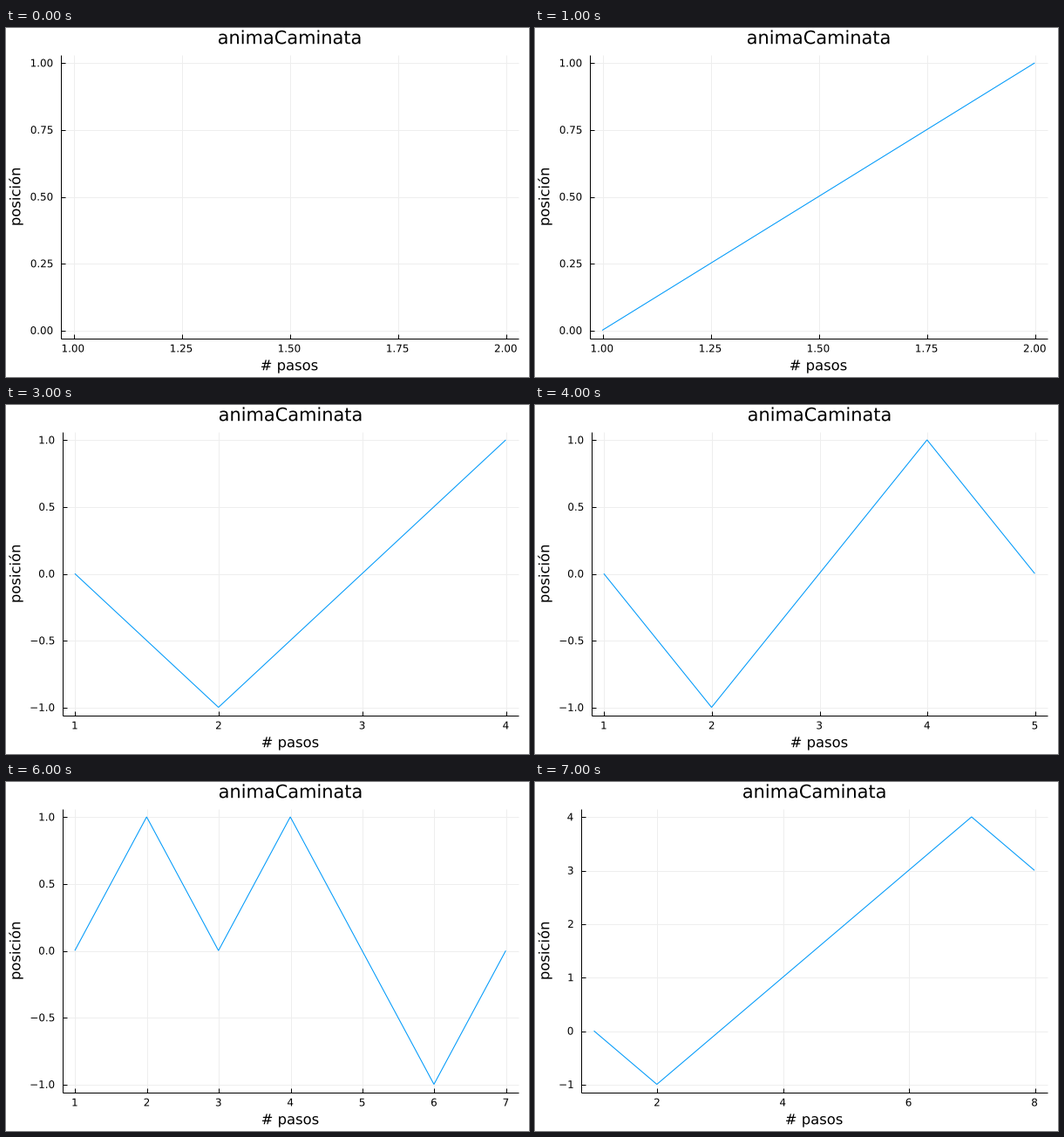
Write a matplotlib script that moves like this. It is 600 by 400 pixels and loops after 8000 ms.

```python
import math

import matplotlib.pyplot as plt
from matplotlib.animation import FuncAnimation
from matplotlib.patches import PathPatch
from matplotlib.textpath import TextPath
from matplotlib.transforms import Affine2D

WIDTH, HEIGHT, DPI = 600, 400, 100
PX = 72 / DPI                      # one pixel in points
RIGHT, TOP, BOTTOM = 588.2, 30.8, 355.7
PAD = 0.03                         # data margin on each side
TICK_LEN = 5
TITLE_SIZE, GUIDE_SIZE, TICK_SIZE = 20.9, 16.4, 11.93
LABEL_LEFT, LABEL_GAP = 28.4, 8.8
DIGIT_HEIGHT = 0.729
LINE_COLOR = "#009AFA"
GRID_COLOR = "#EEEEEE"

plt.rcParams["font.family"] = "DejaVu Sans"

# walk, tick step and label decimals for x and y
WALKS = [
    ([0], (0.25, 2), (0.25, 2)),
    ([0, 1], (0.25, 2), (0.25, 2)),
    ([0, -1, -2], (0.5, 1), (0.5, 1)),
    ([0, -1, 0, 1], (1, 0), (0.5, 1)),
    ([0, -1, 0, 1, 0], (1, 0), (0.5, 1)),
    ([0, -1, -2, -1, -2, -1], (1, 0), (0.5, 1)),
    ([0, 1, 0, 1, 0, -1, 0], (1, 0), (0.5, 1)),
    ([0, -1, 0, 1, 2, 3, 4, 3], (2, 0), (1, 0)),
]

fig = plt.figure(figsize=(WIDTH / DPI, HEIGHT / DPI), dpi=DPI, facecolor="white")
ax = fig.add_axes([0, 0, 1, 1])


def crisp(v):
    """Centre of the pixel that holds v."""
    return math.floor(v) + 0.5


def ticks(lo, hi, step, decimals):
    first, last = math.ceil(lo / step), math.floor(hi / step)
    values = [k * step for k in range(first, last + 1)]
    return [(v, f"{v:.{decimals}f}".replace("-", "\u2212")) for v in values]


def text_width(text, size):
    return TextPath((0, 0), text, size=size).get_extents().width


def write(text, x, y, size, align="center", angle=0):
    """Outline text; y is the baseline, x the aligned edge of the ink."""
    path = TextPath((0, 0), text, size=size)
    box = path.get_extents()
    anchor = box.x1 if align == "right" else (box.x0 + box.x1) / 2
    place = Affine2D().translate(-anchor, 0).rotate_deg(angle).scale(1, -1).translate(x, y)
    ax.add_patch(PathPatch(place.transform_path(path), facecolor="black", linewidth=0))


def stroke(xs, ys, color="black", width=1.0, **style):
    ax.plot(xs, ys, color=color, linewidth=width * PX, solid_capstyle="butt", **style)


def scale(lo, hi, start, end):
    """Map lo..hi into start..end, leaving the margin at both ends."""
    span = (end - start) / (1 + 2 * PAD)
    origin = start + PAD * span
    return lambda v: origin + (v - lo) / (hi - lo) * span


def draw(i):
    walk, x_format, y_format = WALKS[i]
    n = len(walk)
    x_lo, x_hi = 1, max(n, 2)
    y_lo, y_hi = (min(walk), max(walk)) if n > 1 else (0, 1)
    x_ticks = ticks(x_lo, x_hi, *x_format)
    y_ticks = ticks(y_lo, y_hi, *y_format)

    left = LABEL_LEFT + LABEL_GAP + max(text_width(s, TICK_SIZE) for _, s in y_ticks)
    to_x = scale(x_lo, x_hi, left, RIGHT)
    to_y = scale(y_lo, y_hi, BOTTOM, TOP)
    spine_x, spine_y = crisp(left), crisp(BOTTOM)

    ax.clear()
    ax.set_xlim(0, WIDTH)
    ax.set_ylim(HEIGHT, 0)
    ax.axis("off")

    for v, label in x_ticks:
        x = crisp(to_x(v))
        stroke([x, x], [TOP, BOTTOM], GRID_COLOR, zorder=1)
        stroke([x, x], [spine_y, spine_y - TICK_LEN], zorder=2)
        write(label, to_x(v), 371.4, TICK_SIZE)
    for v, label in y_ticks:
        y = crisp(to_y(v))
        stroke([left, RIGHT], [y, y], GRID_COLOR, zorder=1)
        stroke([spine_x, spine_x + TICK_LEN], [y, y], zorder=2)
        write(label, left - LABEL_GAP, to_y(v) + DIGIT_HEIGHT * TICK_SIZE / 2,
              TICK_SIZE, "right")

    stroke([spine_x, spine_x], [TOP, spine_y + 0.5], zorder=2)
    stroke([spine_x, RIGHT], [spine_y, spine_y], zorder=2)

    if n > 1:
        stroke([to_x(k + 1) for k in range(n)], [to_y(v) for v in walk],
               LINE_COLOR, 1.05, zorder=3, snap=False, solid_joinstyle="miter")

    middle = (left + RIGHT) / 2
    write("animaCaminata", middle, 18.2, TITLE_SIZE)
    write("# pasos", middle, 392.2, GUIDE_SIZE)
    write("posición", 16.3, (TOP + BOTTOM) / 2, GUIDE_SIZE, angle=90)
    return []


anim = FuncAnimation(fig, draw, frames=len(WALKS), interval=1000,
                     repeat=True, repeat_delay=0, blit=False)
plt.show()
```
